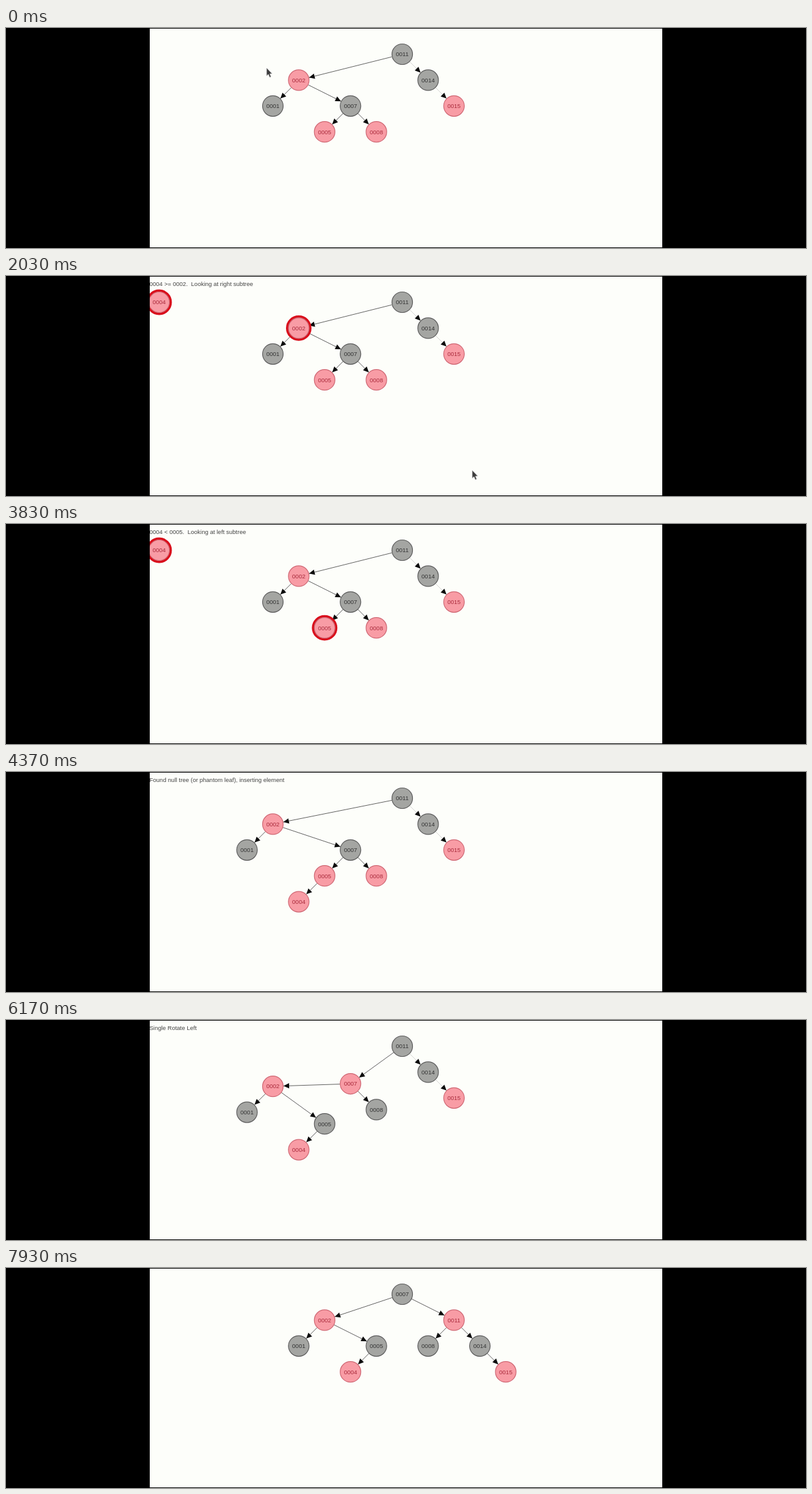
An HTML page for the animation above (8 s loop, 1280x352 px).

```html
<!DOCTYPE html>
<html lang="en">
<head>
<meta charset="utf-8">
<title>Red-black tree insertion</title>
<style>
  html, body { margin: 0; width: 100%; height: 100%; overflow: hidden; background: #000; }
  svg { display: block; width: 1280px; height: 352px; }
  text { font: 9.5px "Liberation Sans", Arial, sans-serif; white-space: pre; }
</style>
</head>
<body>
<svg viewBox="0 0 1280 352">
  <clipPath id="clip"><rect x="230" y="1" width="820" height="350"/></clipPath>
  <g clip-path="url(#clip)">
    <rect x="230" y="1" width="820" height="350" fill="#fdfefa"/>
    <text id="message" x="229.5" y="16" fill="#444"></text>
    <g id="edges"></g>
    <g id="nodes"></g>
    <circle id="probe" r="16.5" fill="none" stroke="#1f981f" stroke-width="2.6"/>
    <path id="cursor" d="M0 0V12.5L2.8 10L5 15L7 14L5 9.3L8.6 9Z" fill="#3c3c3c" stroke="#c8c8c8" stroke-width=".7"/>
  </g>
</svg>
<script>
const LOOP = 8000, STEP = 420, START = 899, R = 17;
const at = n => START + n * STEP;
const INSERT = at(7), PUSH = at(9), LEFT = at(10), RIGHT = at(13), DONE = at(16);
const IDS = [11, 14, 15, 2, 1, 7, 5, 8, 4];
const label = id => String(id).padStart(4, '0');
const find = id => document.getElementById(id);

// Column and row of every node, in the order of IDS, and when each move begins
const layouts = [
  [-Infinity, '0,0 1,1 2,2 -4,1 -5,2 -2,2 -3,3 -1,3'],
  [INSERT, '0,0 1,1 2,2 -5,1 -6,2 -2,2 -3,3 -1,3 -4,4'],
  [at(12), '0,0 1,1 2,2 -5,2 -6,3 -2,1 -3,3 -1,2 -4,4'],
  [at(15), '2,1 3,2 4,3 -3,1 -4,2 0,0 -1,2 1,2 -2,3']
].map(([time, cells]) => {
  const spots = cells.split(' ').map(c => {
    const [col, row] = c.split(',');
    return [634 + col * 41.4, 42 + row * 41.4];
  });
  if (spots.length < IDS.length) spots.push([245, 42]);
  return { time, spots };
});

const edgePhases = [
  [0, '11-14 14-15 11-2 2-1 2-7 7-5 7-8'],
  [INSERT, '11-14 14-15 11-2 2-1 2-7 7-5 7-8 5-4'],
  [at(11), '11-14 14-15 11-7 7-2 2-1 2-5 7-8 5-4'],
  [at(14), '11-14 14-15 7-11 7-2 2-1 2-5 11-8 5-4']
].map(([time, list]) => [time, list.split(' ').map(e => e.split('-').map(Number))]);

const redPhases = [
  [0, [2, 15, 5, 8, 4]],
  [LEFT, [2, 15, 7, 4]],
  [DONE, [2, 15, 11, 4]]
];

const compare = (id, sign, side) => `0004 ${sign} ${label(id)}.  Looking at ${side} subtree`;
const messages = [
  [0, ''],
  [at(-1), 'Inserting 0004'],
  [at(0), compare(11, '<', 'left')],
  [at(2), compare(2, '>=', 'right')],
  [at(4), compare(7, '<', 'left')],
  [at(6), compare(5, '<', 'left')],
  [INSERT, 'Found null tree (or phantom leaf), inserting element'],
  [PUSH, 'Node and parent are both red.  Uncle of node is red -- push blackness down from grandparent'],
  [LEFT, 'Single Rotate Left'],
  [RIGHT, 'Single Rotate Right'],
  [DONE, '']
];

const route = [11, 2, 7, 5];
const cursorPath = [[0, 417, 64], [920, 417, 64], [1600, 746, 311], [2780, 746, 311],
  [3230, 817, 262], [3700, 1056, 170]];

const lerp = (a, b, p) => a + (b - a) * p;
const clamp = p => Math.max(0, Math.min(1, p));
const latest = (list, t) => list.filter(item => item[0] <= t).pop()[1];

function make(parent, tag, attrs) {
  const el = document.createElementNS('http://www.w3.org/2000/svg', tag);
  set(el, attrs);
  return parent.appendChild(el);
}
function set(el, attrs) {
  for (const key in attrs) el.setAttribute(key, attrs[key]);
}
const show = (el, on) => el.setAttribute('visibility', on ? 'visible' : 'hidden');

const nodes = IDS.map(id => {
  const g = make(find('nodes'), 'g', {});
  const ring = make(g, 'circle', { r: 18.4, fill: 'none', stroke: '#d90f1c', 'stroke-width': 4 });
  const disc = make(g, 'circle', { r: R - .5, 'stroke-width': 1.2 });
  const text = make(g, 'text', { y: 3.3, 'text-anchor': 'middle' });
  text.textContent = label(id);
  return { id, g, ring, disc, text };
});

const edges = edgePhases[1][1].map(() => {
  const g = make(find('edges'), 'g', {});
  return {
    g,
    glow: make(g, 'path', { stroke: '#e0202c', 'stroke-width': 4 }),
    line: make(g, 'path', { stroke: '#4c4c4c', 'stroke-width': .9 }),
    head: make(g, 'path', { d: 'M0 0L-9 -4.2V4.2Z', fill: '#0c0c0c' })
  };
});

function positions(t) {
  let i = layouts.length - 1;
  while (layouts[i].time > t) i--;
  const to = layouts[i].spots, from = layouts[Math.max(0, i - 1)].spots;
  const p = i ? clamp((t - layouts[i].time) / STEP) : 1;
  return Object.fromEntries(IDS.map((id, n) =>
    [id, [lerp(from[n][0], to[n][0], p), lerp(from[n][1], to[n][1], p)]]));
}

function drawEdges(t, pos) {
  const list = latest(edgePhases, t);
  edges.forEach((edge, i) => {
    show(edge.g, i < list.length);
    if (i >= list.length) return;
    const [from, to] = list[i];
    const [x1, y1] = pos[from], [x2, y2] = pos[to];
    const a = Math.atan2(y2 - y1, x2 - x1), dx = Math.cos(a) * R, dy = Math.sin(a) * R;
    const d = `M${x1 + dx} ${y1 + dy}L${x2 - dx} ${y2 - dy}`;
    const lit = t >= LEFT && t < at(11) && from === 2 && to === 7 ||
      t >= RIGHT && t < at(14) && from === 11 && to === 7;
    edge.glow.setAttribute('d', lit ? d : 'M0 0');
    set(edge.line, { d, opacity: to > 11 && t < at(15) ? .25 : 1 });
    edge.head.setAttribute('transform',
      `translate(${x2 - dx} ${y2 - dy}) rotate(${a * 180 / Math.PI})`);
  });
}

function drawNodes(t, pos, active) {
  const reds = latest(redPhases, t);
  for (const { id, g, ring, disc, text } of nodes) {
    const red = reds.includes(id);
    show(g, id !== 4 || t >= START);
    g.setAttribute('transform', `translate(${pos[id]})`);
    ring.setAttribute('opacity', active && (id === 4 || id === active) ? 1 : 0);
    set(disc, { fill: red ? '#f89ca5' : '#a4a5a2', stroke: red ? '#cf6672' : '#5b5b5b' });
    text.setAttribute('fill', red ? '#a92a3b' : '#333');
  }
}

function drawCursor(t) {
  const i = cursorPath.findIndex(p => p[0] > t);
  const cursor = find('cursor');
  show(cursor, i > 0);
  if (i < 1) return;
  const [t0, x0, y0] = cursorPath[i - 1], [t1, x1, y1] = cursorPath[i];
  const p = (t - t0) / (t1 - t0);
  cursor.setAttribute('transform', `translate(${lerp(x0, x1, p)} ${lerp(y0, y1, p)})`);
}

function draw(t) {
  const pos = positions(t);
  const step = Math.floor((t - START) / STEP), hop = step >> 1;
  const searching = step >= 0 && step < 7, moving = step % 2 === 1;
  drawEdges(t, pos);
  drawNodes(t, pos, searching && !moving ? route[hop] : 0);
  const probe = find('probe');
  show(probe, searching && moving);
  if (searching && moving) {
    const a = pos[route[hop]], b = pos[route[hop + 1]], p = (t - at(step)) / STEP;
    set(probe, { cx: lerp(a[0], b[0], p), cy: lerp(a[1], b[1], p) });
  }
  find('message').textContent = latest(messages, t);
  drawCursor(t);
}

let begin;
function tick(now) {
  begin ??= now;
  draw((now - begin) % LOOP);
  requestAnimationFrame(tick);
}
draw(0);
requestAnimationFrame(tick);
</script>
</body>
</html>
```
